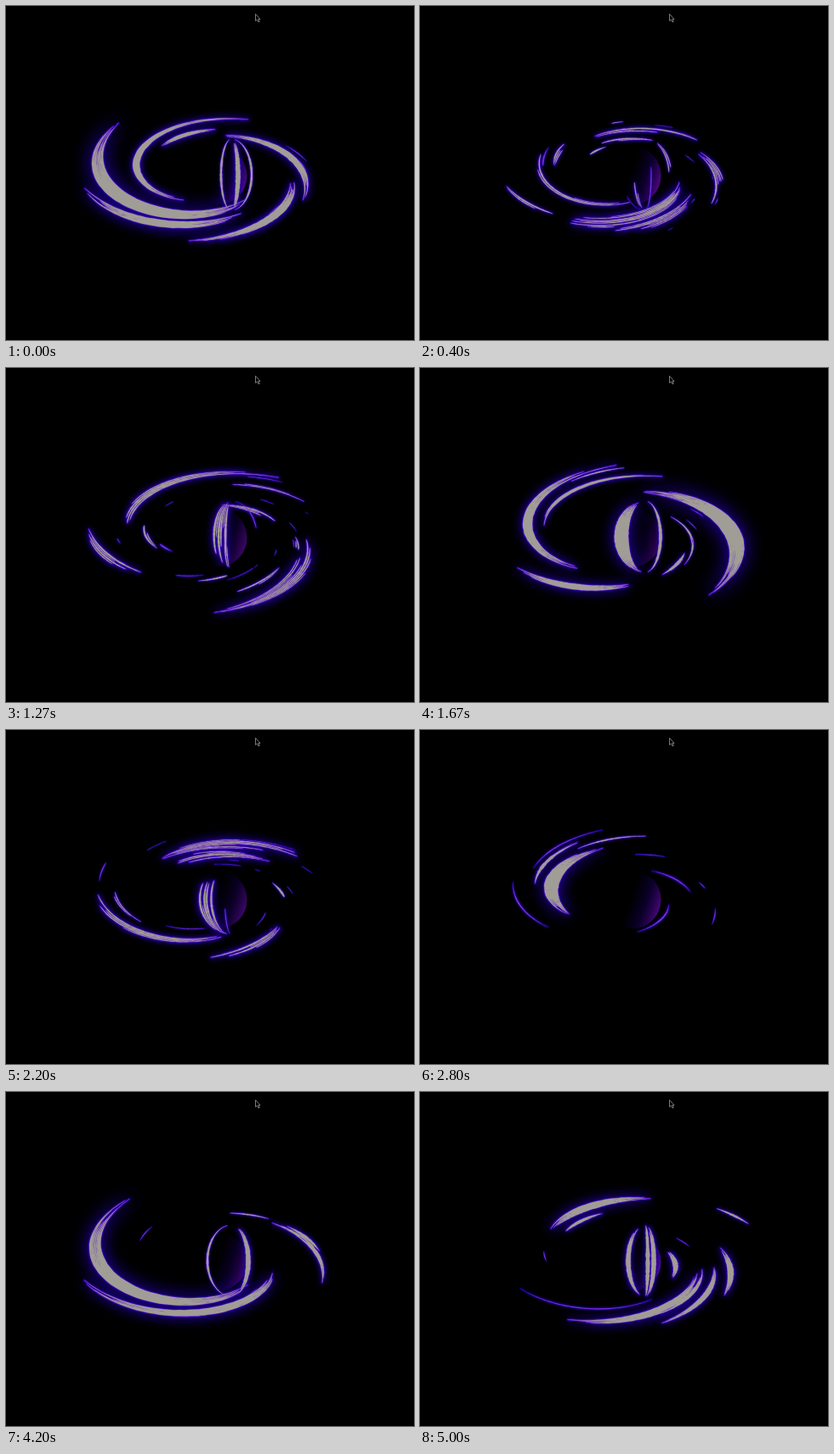
These frames come from a looping animation (480x394 px, 5070 ms). An HTML page with a canvas:

```html
<!DOCTYPE html>
<html lang="en">
<head>
<meta charset="utf-8">
<title>Violet swirl</title>
<style>
html, body { margin: 0; width: 100%; height: 100%; overflow: hidden; background: #000; }
canvas { display: block; }
</style>
</head>
<body>
<canvas id="stage" width="480" height="394"></canvas>
<script>
const ctx = document.getElementById('stage').getContext('2d');
const LOOP = 5070, STEPS = 76, RATE = 0.015;
const TILT = 0.55;      // flattening of the disc
const WIND = 0.0041;    // inward pull of the spiral, per degree
const SPIN = 6;         // degrees per step
const RAD = Math.PI / 180;

// arcs: [start angle, span, radius, width] on the spiral
// ribs: [sideways bulge, width] across the orb
const bursts = [
  { at: 0, light: 0.9, ribs: [[8, 5], [24, 2], [-12, 2]], arcs: [
    [133, 178, 150, 21], [191, 108, 147, 15], [64, 198, 128, 8], [-30, 112, 130, 9],
    [258, 92, 148, 8], [276, 77, 142, 7], [82, 50, 96, 7]] },
  { at: 12, light: 0.8, ribs: [[16, 5]], arcs: [
    [124, 23, 112, 4], [97, 70, 82, 6], [142, 36, 60, 4], [52, 33, 91, 2],
    [182, 44, 101, 3], [224, 57, 138, 6], [287, 30, 119, 6], [-45, 77, 94, 8]] },
  { at: 25, light: 0.6, ribs: [[-28, 16], [18, 3]], arcs: [
    [91, 155, 152, 11], [67, 102, 138, 5], [88, 28, 146, 2], [207, 75, 141, 12],
    [-51, 127, 165, 21], [301, 33, 97, 4], [-39, 73, 98, 2]] },
  { at: 42, light: 0.8, ribs: [], arcs: [
    [100, 111, 109, 17], [77, 38, 136, 2], [113, 50, 128, 4], [98, 50, 147, 1.5],
    [165, 52, 130, 1.5], [9, 48, 84, 1.8], [286, 60, 76, 1.8]] },
  { at: 54, light: 0.7, ribs: [[-14, 3]], arcs: [
    [102, 54, 140, 6], [138, 82, 127, 10], [134, 129, 147, 6], [193, 69, 134, 2],
    [187, 91, 108, 3], [-40, 46, 143, 4]] },
  { at: 63, light: 0.7, ribs: [[20, 5], [-28, 2]], arcs: [
    [123, 192, 160, 19], [194, 155, 152, 14], [-22, 72, 147, 5], [8, 29, 135, 4],
    [50, 24, 115, 2]] },
  { at: 75, light: 1, ribs: [[10, 5], [3, 4], [-20, 5]], arcs: [
    [74, 68, 137, 13], [101, 36, 102, 5], [208, 86, 132, 1.8], [240, 104, 146, 13],
    [289, 63, 145, 7], [285, 63, 128, 5], [-34, 47, 146, 7], [27, 17, 170, 3],
    [-36, 60, 74, 6]] }
];

const clamp = v => Math.max(0, Math.min(1, v));
const swell = (v, power) => Math.pow(Math.max(0, Math.sin(Math.PI * v)), power);

function seeded(seed) {
  return () => {
    seed = (seed * 16807 + 11) % 2147483647;
    return seed / 2147483647;
  };
}

// Both return a function from (position along, offset across) to a point
function spiral([start, span, radius], age) {
  return (s, off) => {
    const angle = (start + span * s + age * SPIN) * RAD;
    const r = radius * Math.exp(-WIND * span * s) + off;
    return [235 + r * Math.cos(angle), 198 - r * TILT * Math.sin(angle)];
  };
}

function meridian(bulge, age) {
  const m = 32 * Math.cos(Math.acos(bulge / 32) + age * SPIN * RAD);
  return (s, off) => {
    const lat = (s - 0.5) * 160 * RAD;
    return [265 + m * Math.cos(lat) + off, 199 + 42 * Math.sin(lat)];
  };
}

// A brush mark of several lanes that fray and wear away separately
function brush(place, width, power, age, seed) {
  const rnd = seeded(seed), path = new Path2D(), N = 44;
  const lanes = Math.max(1, Math.round(width / 2.8));
  const fray = lanes > 1 ? 0.18 : 0;
  for (let j = 0; j < lanes; j++) {
    let from = rnd() * fray, to = 1 - rnd() * fray;
    const left = clamp(power * 1.5 - rnd() * 0.5);
    if (!left) continue;
    const span = (to - from) * left;
    if (age < 0) to = from + span; else from = to - span;
    const outer = [], inner = [];
    for (let k = 0; k <= N; k++) {
      const s = from + (to - from) * k / N;
      const body = width * swell(s, 0.75);
      const off = ((j + 0.5) / lanes - 0.5) * body;
      const half = (body / lanes * 0.56 * left + 0.1) * swell(k / N, 0.4) * (0.8 + rnd() * 0.36);
      outer.push(place(s, off + half));
      inner.unshift(place(s, off - half));
    }
    outer.concat(inner).forEach((p, k) => k ? path.lineTo(...p) : path.moveTo(...p));
    path.closePath();
  }
  return { path, width: width * power };
}

function burstMarks(burst, power, age, seed) {
  const rnd = seeded(seed);
  const wisps = Array.from({ length: 4 }, () => [rnd() * 360, 8 + rnd() * 14, 85 + rnd() * 50, 1]);
  const arcs = burst.arcs.concat(wisps).map(a => [spiral(a, age), a[3]]);
  const ribs = burst.ribs.map(([bulge, w]) => [meridian(bulge, age), w]);
  return arcs.concat(ribs).map(([place, w], i) => brush(place, w, power, age, seed + 7919 * i));
}

function drawOrb(light) {
  const g = ctx.createLinearGradient(249, 192, 284, 204);
  g.addColorStop(0, 'rgba(14,0,64,0)');
  g.addColorStop(0.5, 'rgba(26,0,100,.5)');
  g.addColorStop(1, 'rgba(98,10,164,.9)');
  ctx.globalAlpha = light;
  ctx.fillStyle = g;
  ctx.beginPath();
  ctx.ellipse(251, 200, 32.5, 34, 0, 0, Math.PI * 2);
  ctx.fill();
  ctx.globalAlpha = 1;
}

const cursor = new Path2D('M293.5 9.5V17.5L295.5 16L297 19L298.3 18.4L297 15.5H299Z');
function drawCursor() {
  ctx.fillStyle = '#000';
  ctx.fill(cursor);
  ctx.strokeStyle = '#999';
  ctx.lineWidth = 0.8;
  ctx.stroke(cursor);
}

function drawMarks(marks) {
  ctx.lineJoin = 'round';
  ctx.shadowColor = '#2400b4';
  ctx.strokeStyle = '#20008c';
  for (const m of marks) {
    ctx.shadowBlur = 1 + m.width;
    ctx.lineWidth = Math.min(3, 0.6 + m.width * 0.4);
    ctx.stroke(m.path);
  }
  ctx.shadowBlur = 0;
  ctx.strokeStyle = '#6a20d0';
  ctx.lineWidth = 0.9;
  for (const m of marks) if (m.width >= 2) ctx.stroke(m.path);
  for (const m of marks) {
    ctx.fillStyle = m.width < 2 ? '#7a30dc' : '#a09d96';
    ctx.fill(m.path);
  }
}

function draw(step) {
  ctx.fillStyle = '#000';
  ctx.fillRect(0, 0, 480, 394);
  const marks = [];
  let light = 0;
  bursts.forEach((burst, i) => {
    const age = step - burst.at;
    const near = bursts[i + (age < 0 ? -1 : 1)];
    const gap = near ? Math.abs(near.at - burst.at) : STEPS;
    const power = clamp(1 - Math.abs(age) / gap);
    if (!power) return;
    light += burst.light * power;
    marks.push(...burstMarks(burst, power, age, 977 * (i + 1)));
  });
  drawOrb(clamp(light));
  drawMarks(marks);
  drawCursor();
}

const start = performance.now();
let shown = -1;
function tick() {
  const t = (performance.now() - start) % LOOP;
  const step = Math.min(STEPS - 1, Math.floor((t + 1) * RATE));
  if (step !== shown) draw(shown = step);
  requestAnimationFrame(tick);
}
tick();
</script>
</body>
</html>
```
